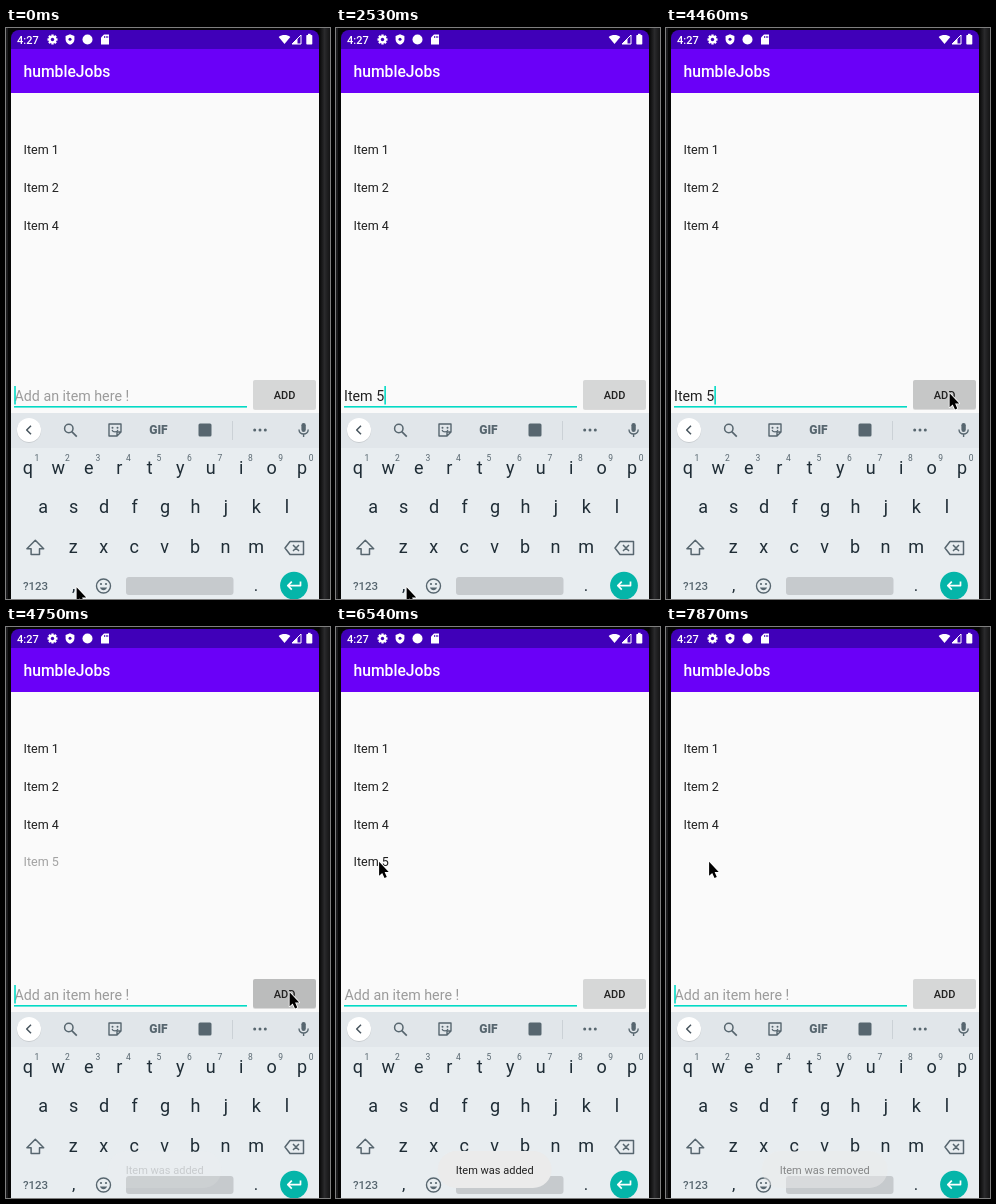
These frames come from a looping animation (324x571 px, 8000 ms). An HTML page with a canvas:

```html
<!DOCTYPE html>
<html lang="en">
<head>
<meta charset="utf-8">
<title>To-do list demo</title>
<style>
html, body { margin: 0; width: 100%; height: 100%; overflow: hidden; background: #000; }
canvas { display: block; width: 324px; height: 571px; }
</style>
</head>
<body>
<canvas id="stage"></canvas>
<script>
const W = 324, H = 571, LOOP = 8000, TICK = 148.5, PITCH = 30.47;
const canvas = document.getElementById('stage');
const ctx = canvas.getContext('2d');
const dpr = window.devicePixelRatio || 1;
canvas.width = W * dpr;
canvas.height = H * dpr;

const INK = '#1f2d36', ICON = '#57666f', TEAL = '#03dac5', STATUS = '#4000b9';

// ---- helpers ----
function rect(x, y, w, h, fill) {
  ctx.fillStyle = fill;
  ctx.fillRect(x, y, w, h);
}
function round(x, y, w, h, r, fill) {
  ctx.beginPath();
  ctx.roundRect(x, y, w, h, r);
  ctx.fillStyle = fill;
  ctx.fill();
}
function disc(x, y, r, fill) {
  ctx.beginPath();
  ctx.arc(x, y, r, 0, Math.PI * 2);
  ctx.fillStyle = fill;
  ctx.fill();
}
function ring(x, y, r, color, width) {
  ctx.beginPath();
  ctx.arc(x, y, r, 0, Math.PI * 2);
  ctx.strokeStyle = color;
  ctx.lineWidth = width;
  ctx.stroke();
}
function text(str, x, y, size, color, align = 'left', weight = 400) {
  ctx.font = `${weight} ${size}px Roboto, "Open Sans", sans-serif`;
  ctx.textAlign = align;
  ctx.fillStyle = color;
  ctx.fillText(str, x, y);
}
function shape(d, x, y, fill, stroke, width = 1.4) {
  const p = new Path2D(d);
  ctx.save();
  ctx.translate(x, y);
  if (stroke) {
    ctx.strokeStyle = stroke;
    ctx.lineWidth = width;
    ctx.lineJoin = 'round';
    ctx.stroke(p);
  }
  if (fill) {
    ctx.fillStyle = fill;
    ctx.fill(p);
  }
  ctx.restore();
}
function fade(alpha, draw) {
  if (alpha <= 0) return;
  ctx.save();
  ctx.globalAlpha = alpha;
  draw();
  ctx.restore();
}
// value of the last [tick, value] entry reached
function at(list, n) {
  let v = list[0][1];
  for (const [t, val] of list) if (n >= t) v = val;
  return v;
}

// ---- timeline, in screen refresh ticks ----
const typed = [[0, ''], [3, 'I'], [9, 'It'], [10, 'Ite'], [11, 'Item'], [13, 'Item '], [16, 'Item 5'], [31, '']];
const hints = [
  [0, null], [4, ['I', "I'm", 'In']], [9, ['It', "It's", 'Its']], [10, ['Ite', 'Item', 'Items']],
  [11, ['Item', 'Items', "Item's"]], [13, ['is', 'in', 'number']], [17, null]
];
const caret = [[0, 1], [7, 0], [9, 1], [20, 0], [23, 1], [26, 0], [30, 1], [35, 0], [38, 1], [42, 0], [45, 1], [49, 0], [52, 1]];
const buttonShade = [[0, '#d6d7d7'], [30, '#c6c7c7'], [31, '#bbbcbc'], [33, '#c3c4c4'], [34, '#d0d1d1'], [35, '#d6d7d7']];
const newItem = [[0, 0], [32, 0.4], [33, 1], [53, 0]];
const toastAlpha = [[0, 0], [32, 0.16], [33, 0.85], [34, 1], [45, 0.8], [46, 0.4], [47, 0.15], [48, 0], [53, 0.5]];
const pointer = [
  [0, [70, 558]], [18, [82, 546]], [19, [146, 478]], [20, [236, 388]], [21, [294, 341]], [22, [299.5, 345]],
  [23, [284, 364]], [24, [283, 364]], [35, [262, 340]], [36, [206, 286]], [37, [152, 253]],
  [38, [92, 244]], [39, [62, 240]], [40, [49, 238]], [41, [42.5, 236]], [44, [42.5, 233.5]]
];

// ---- parts ----
function bezel() {
  rect(0, 0, W, H, '#050505');
  rect(0, 0, 2, H, '#1c1c1e');
  const g = ctx.createLinearGradient(313, 0, W, 0);
  g.addColorStop(0, '#050505');
  g.addColorStop(0.5, '#2a2a2c');
  g.addColorStop(1, '#141415');
  rect(313, 0, W - 313, H, g);
}

function statusBar() {
  round(5, 2, 308, 20, [8, 8, 0, 0], STATUS);
  text('4:27', 11, 15.5, 11, '#fff', 'left', 500);

  // gear
  for (let i = 0; i < 4; i++) {
    ctx.save();
    ctx.translate(46.5, 11.5);
    ctx.rotate(i * Math.PI / 4);
    rect(-1.2, -5, 2.4, 10, '#fff');
    ctx.restore();
  }
  disc(46.5, 11.5, 3.8, '#fff');
  disc(46.5, 11.5, 1.7, STATUS);

  shape('M0-5.2L4.4-3.4V0C4.4 2.6 2.6 4.5 0 5.3C-2.6 4.5-4.4 2.6-4.4 0V-3.4Z', 64, 11.5, '#fff');
  disc(64, 11.3, 1.5, STATUS);
  disc(81.5, 11.5, 5, '#fff');
  shape('M-1-5H4V5H-4V-2Z', 99, 11.5, '#fff');
  for (const x of [98, 99.8, 101.4]) rect(x, 8, 0.8, 2, STATUS);

  shape('M0 4.5L-5.8-2.6C-2.5-5.2 2.5-5.2 5.8-2.6Z', 278.5, 11.5, '#fff');
  shape('M4.5-4.5V4.5H-4.5Z', 290.5, 11.5, null, '#fff', 1);
  shape('M1-1V4.5H-4.5Z', 290.5, 11.5, '#fff');
  round(300.3, 7, 6, 9.5, 0.8, '#fff');
  rect(302, 5.8, 2.6, 1.5, '#fff');
}

function appBar() {
  rect(5, 21, 308, 44, '#6a00f8');
  text('humbleJobs', 17.5, 49.3, 15.7, '#fff', 'left', 500);
}

function items(n) {
  const row = (s, i) => text(s, 17.5, 126 + i * 37.75, 12.55, '#212121');
  ['Item 1', 'Item 2', 'Item 4'].forEach(row);
  fade(at(newItem, n), () => row('Item 5', 3));
}

function entry(n) {
  const s = at(typed, n);
  rect(8, 378, 233, 1.6, TEAL);
  if (!s) text('Add an item here !', 8.5, 372.5, 14.25, '#9b9b9b');
  text(s, 8, 372.5, 14.25, '#212121');
  const w = ctx.measureText(s).width;
  if (s && n < 13) rect(8, 374, w, 1, '#212121');
  if (at(caret, n)) rect(8.2 + w, 358, 1.6, 18.5, TEAL);
}

function addButton(n) {
  round(247, 353, 63, 29, 2, 'rgba(0,0,0,.13)');
  round(247, 352, 63, 29, 2, at(buttonShade, n));
  text('ADD', 278.5, 370.5, 11, '#212121', 'center', 500);
}

function strip(n) {
  const words = at(hints, n);
  rect(5, 385, 308, 35, '#e1e6ea');
  disc(23, 402.7, 12.2, 'rgba(0,0,0,.12)');
  disc(23, 402, 12, '#fff');
  shape(words ? 'M-2-4.3L2.3 0L-2 4.3' : 'M2-4.3L-2.3 0L2 4.3', 23, 402, null, '#46545d', 1.5);

  // microphone
  round(295.4, 395, 4.4, 9, 2.2, ICON);
  shape('M-4.6 0C-4.6 6 4.6 6 4.6 0M0 4.6V7.6', 297.6, 401.5, null, ICON, 1.4);

  if (words) {
    words.forEach((s, i) => text(s, 74 + i * 84, 408, 14, '#5d6a73', 'center'));
    for (const x of [113, 203]) rect(x, 393, 1, 19, '#cbd1d6');
    return;
  }
  ring(62.8, 400.5, 4.2, ICON, 1.5);
  shape('M0 0L5 5', 65.8, 403.6, null, ICON, 1.7);

  shape('M-6-6H6V2L2 6H-6ZM6 2H2V6', 109, 402, null, ICON, 1.4);
  disc(106.5, 399.8, 1, ICON);
  disc(111.5, 399.8, 1, ICON);
  shape('M-3 0C-2 2.5 2 2.5 3 0', 109, 402, null, ICON, 1.2);

  text('GIF', 152.5, 406, 12, ICON, 'center', 900);
  round(192.5, 395.5, 13, 13, 1.5, ICON);
  rect(226, 393, 1, 19, '#cbd1d6');
  for (const x of [248.7, 254, 259.3]) disc(x, 402, 1.5, ICON);
}

function keyRow(letters, x, y, size = 18, color = INK) {
  [...letters].forEach((c, i) => text(c, x + i * PITCH, y, size, color, 'center'));
}

function keyboard() {
  rect(5, 420, 308, 151, '#e8edf0');
  keyRow('qwertyuiop', 21.8, 446);
  keyRow('1234567890', 31, 433, 8.5, ICON);
  keyRow('asdfghjkl', 37.1, 485.3);
  keyRow('zxcvbnm', 67.2, 525);

  shape('M0-7.3L8.4 1.2H4.2V7H-4.2V1.2H-8.4Z', 29.3, 519.5, null, ICON, 1.5);
  shape('M-9.5 0L-4.5-6.5H9V6.5H-4.5ZM-1.5-3L4.5 3M4.5-3L-1.5 3', 288.5, 520, null, ICON, 1.5);

  text('?123', 29.5, 562, 11.5, ICON, 'center', 500);
  text(',', 67.7, 563, 17, INK, 'center');
  text('.', 250, 563, 17, INK, 'center');
  ring(97.5, 558, 7, ICON, 1.4);
  disc(95, 556, 1.1, ICON);
  disc(100, 556, 1.1, ICON);
  shape('M-3.6 0C-2.4 3.4 2.4 3.4 3.6 0Z', 97.5, 559.6, ICON);
  round(120, 549, 107.5, 18, 3, '#c6cacd');
  disc(288, 557.6, 13.9, '#05b5a9');
  shape('M6.5-4V0H-6M-2.2-4L-6.2 0L-2.2 4', 288, 557.6, null, '#fff', 1.7);
}

function toast(n) {
  const msg = n < 50 ? 'Item was added' : 'Item was removed';
  fade(at(toastAlpha, n), () => {
    ctx.font = '400 11px Roboto, "Open Sans", sans-serif';
    const w = ctx.measureText(msg).width + 36;
    round(158.7 - w / 2, 524, w, 37, 18.5, '#ebebeb');
    text(msg, 158.7, 547, 11, '#222', 'center');
  });
}

function arrow(n) {
  const [x, y] = at(pointer, n);
  shape('M.6 1.2V15.2L3.7 12.4L6 17.6L8.3 16.6L6.1 11.5H10.2Z', x, y, '#000', '#fff', 1.6);
}

function draw(ms) {
  const n = Math.floor((ms % LOOP + 1) / TICK);
  ctx.setTransform(dpr, 0, 0, dpr, 0, 0);
  bezel();
  rect(5, 21, 308, 550, '#fafafa');
  statusBar();
  appBar();
  items(n);
  entry(n);
  addButton(n);
  strip(n);
  keyboard();
  toast(n);
  arrow(n);
}

const start = performance.now();
function loop() {
  draw(performance.now() - start);
  requestAnimationFrame(loop);
}
loop();
</script>
</body>
</html>
```
